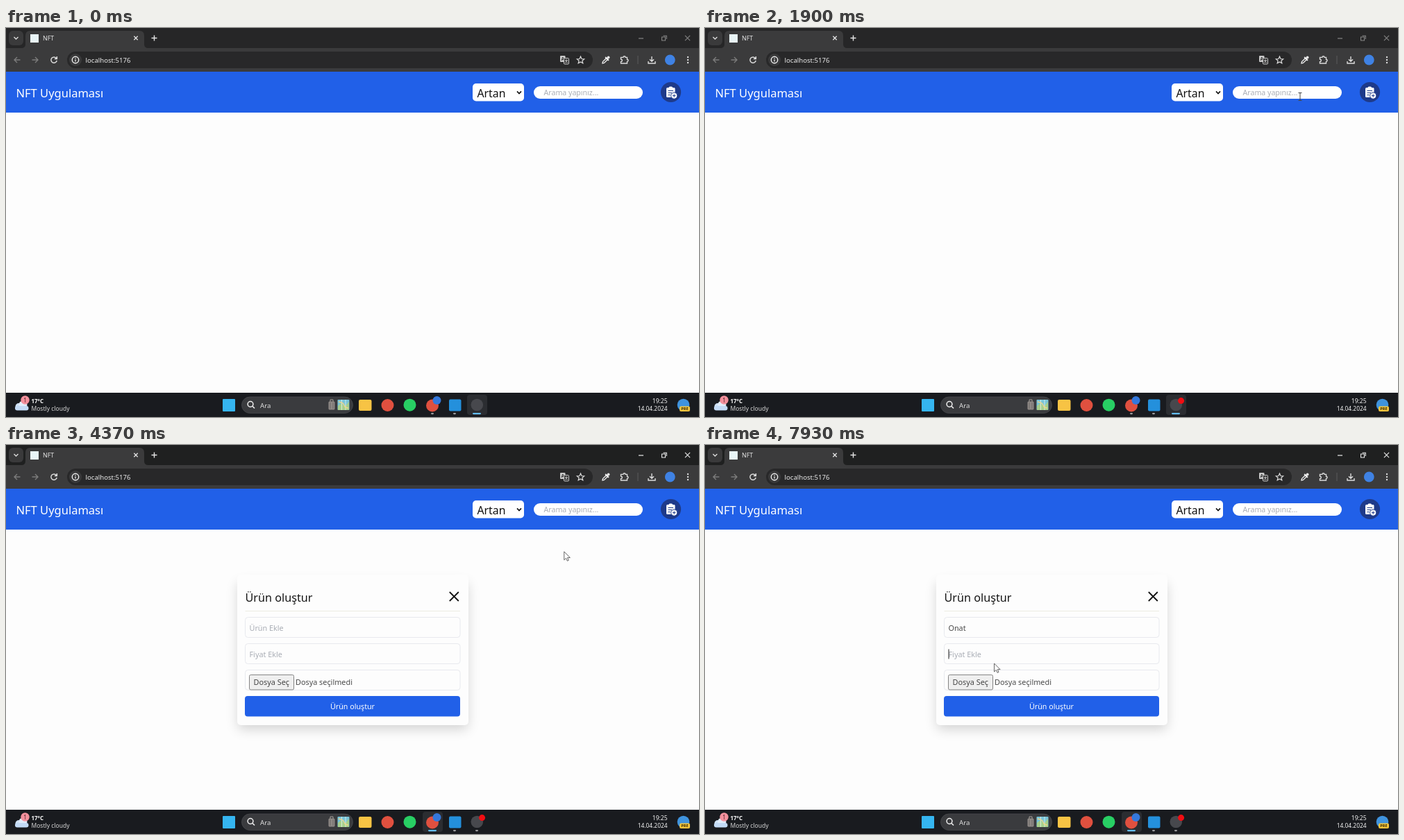
An HTML page with a canvas for the animation above (8000 ms loop, 998 px wide and 561 px high).

```html
<!DOCTYPE html>
<html lang="tr">
<head>
<meta charset="utf-8">
<title>NFT</title>
<style>
  html, body { margin: 0; width: 100%; height: 100%; overflow: hidden; background: #fdfdfd; }
  canvas { display: block; width: 100%; height: 100%; }
</style>
</head>
<body>
<canvas id="stage"></canvas>
<script>
const W = 998, H = 561, LOOP = 8000;
const BLUE = '#2160e8', PAPER = '#fdfdfd', ICON = '#dcdcdc', DIM = '#7c7c7c';
const canvas = document.getElementById('stage');
const ctx = canvas.getContext('2d');
const dpr = window.devicePixelRatio || 1;
canvas.width = W * dpr;
canvas.height = H * dpr;

// Timeline in ms
const RECORD = 300, FOCUS_SEARCH = 2170, PRESS_ADD = 3850, OPEN = 4000;
const FOCUS_NAME = 4750, KEYS = [5800, 6130, 6450, 6850], POINTER_BACK = 7080, FOCUS_PRICE = 7640;
const NAME = 'Onat';

// Pointer path: time, x, y
const PATH = [
  [620, -8, 228], [670, 4, 225], [840, 18, 214], [1120, 330, 130], [1400, 830, 58],
  [1530, 965, 42], [1670, 930, 75], [1820, 860, 98], [1900, 857, 99], [2300, 855, 100],
  [2900, 855, 100], [3200, 912, 76], [3340, 917, 81], [3650, 966, 95], [4150, 966, 95],
  [4230, 960, 101], [4660, 482, 262], [4900, 480, 262], [5200, 479, 248], [5800, 479, 248],
  [POINTER_BACK, 479, 252], [7500, 424, 301], [7660, 420, 303], [7900, 416, 315]
];

function rect(x, y, w, h, color) {
  ctx.fillStyle = color;
  ctx.fillRect(x, y, w, h);
}

function box(x, y, w, h, r, fill, stroke, lw = 1) {
  ctx.beginPath();
  ctx.roundRect(x, y, w, h, r);
  if (fill) { ctx.fillStyle = fill; ctx.fill(); }
  if (stroke) { ctx.strokeStyle = stroke; ctx.lineWidth = lw; ctx.stroke(); }
}

function disc(x, y, r, fill, stroke, lw = 1.3) {
  ctx.beginPath();
  ctx.arc(x, y, r, 0, Math.PI * 2);
  if (fill) { ctx.fillStyle = fill; ctx.fill(); }
  if (stroke) { ctx.strokeStyle = stroke; ctx.lineWidth = lw; ctx.stroke(); }
}

// Draws an SVG path with its origin at x, y.
function path(x, y, d, stroke, lw = 1.4, fill) {
  const p = new Path2D(d);
  ctx.save();
  ctx.translate(x, y);
  if (fill) { ctx.fillStyle = fill; ctx.fill(p); }
  if (stroke) { ctx.strokeStyle = stroke; ctx.lineWidth = lw; ctx.stroke(p); }
  ctx.restore();
}

function text(s, x, y, size, color, align = 'left', weight = 400) {
  ctx.font = `${weight} ${size}px "Noto Sans", "Open Sans", sans-serif`;
  ctx.textAlign = align;
  ctx.fillStyle = color;
  ctx.fillText(s, x, y);
}

function drawTabs(active) {
  const tone = active ? '#ededed' : '#858585';
  rect(0, 0, W, 29, active ? '#1f2020' : '#262627');
  box(4, 4, 21, 21, 6, '#3a3a3b');
  path(14.5, 14.5, 'M-3-1.5L0 1.5L3-1.5', ICON);
  path(0, 0, 'M22 29Q28 29 28 23V11Q28 4 35 4H192Q199 4 199 11V23Q199 29 205 29Z', null, 1, '#3b3b3c');
  rect(35, 9, 12, 12, '#e9f5f7');
  text('NFT', 53, 18, 8.8, '#e6e6e6');
  path(187, 14.5, 'M-2.7-2.7L2.7 2.7M2.7-2.7L-2.7 2.7', '#e4e4e4', 1.3);
  path(213.5, 14.5, 'M-4 0H4M0-4V4', '#e4e4e4', 1.4);
  path(914.5, 15, 'M-3.5 0H3.5', tone, 1.2);
  path(948, 14.5, 'M-3.5-1.5H1.5V3.5H-3.5ZM-1.5-3.2H3.3V1.5', tone, 1.1);
  path(981.5, 14.5, 'M-3.6-3.6L3.6 3.6M3.6-3.6L-3.6 3.6', tone, 1.1);
}

function drawToolbar() {
  rect(0, 29, W, 34, '#3b3b3c');
  path(16, 46, 'M4.5 0H-4M0-4L-4 0L0 4', DIM);
  path(42, 46, 'M-4.5 0H4M0-4L4 0L0 4', DIM);
  path(69, 46, 'M3.6-2.2A4.2 4.2 0 1 0 4.2 1M4.3-5V-1.6H.9', ICON, 1.5);
  box(88, 34, 757, 24, 12, '#282829');
  disc(100, 46, 9, '#3a3a3b');
  disc(100, 46, 4.7, null, '#f0f0f0', 1.4);
  path(100, 46, 'M0-.4V2.6M0-2.7V-1.4', '#f0f0f0', 1.3);
  text('localhost:5176', 114.5, 49.7, 9.6, '#ececec');

  // Translate, star, pipette, extensions, download
  box(798, 40, 7.5, 9, 1, '#c9c9c9');
  text('A', 801.7, 47, 6.5, '#333', 'center', 700);
  box(803.5, 43.5, 7, 8.5, 1, '#333', '#c9c9c9', 1);
  path(807, 48, 'M-2-1.5H2M0-2.7V-1.5M1.3-1.5Q.5 1.2-2 2M-1.2-1Q0 1.4 2 2', '#c9c9c9', .8);
  path(827.5, 46.3, 'M0-5.2L1.5-1.8L5.2-1.5L2.4.9L3.3 4.5L0 2.6L-3.3 4.5L-2.4.9L-5.2-1.5L-1.5-1.8Z', ICON, 1.2);
  path(864, 46, 'M-5 5L-4.5 2.6L.6-2.5L2.5-.6L-2.6 4.5Z', '#f2f2f2', 1.3);
  path(864, 46, 'M-.8-4L4 .8M1.6-1.6L4-4', '#f2f2f2', 2);
  disc(867.6, 42.4, 1.9, '#f2f2f2');
  path(890.5, 46, 'M-5-3.6H-1.6A1.6 1.6 0 0 1 1.6-3.6H4V-.8A1.6 1.6 0 0 1 4 2.4V5H-5V2.6A1.8 1.8 0 0 0-5-1Z', ICON, 1.4);
  rect(909.5, 40, 1, 12, '#5c5c5d');
  path(930, 46, 'M0-5V2M-3-.8L0 2.2L3-.8M-5 2V5H5V2', ICON, 1.4);
  disc(956.3, 46, 7.4, '#3f82e4');
  for (const dy of [-4, 0, 4]) disc(982, 46 + dy, 1.2, ICON);
}

function drawHeader(t) {
  rect(0, 63, W, 59, BLUE);
  text('NFT Uygulaması', 14.5, 100, 16.5, '#fff');
  box(672, 80, 74, 25.5, 5, '#fff');
  text('Artan', 678.5, 100, 15.8, '#111');
  path(739, 93, 'M-3-1.6L0 1.6L3-1.6', '#111', 1.6);

  const focused = t >= FOCUS_SEARCH && t < PRESS_ADD;
  if (focused) box(758.2, 82.2, 160.6, 21.6, 10.8, '#fff');
  box(760, 84, 157, 18, 9, '#fff', focused && '#101010', 1.5);
  text('Arama yapınız...', 774.5, 97, 10.6, '#a9adb5');
  if (focused) drawCaret(774.5, 93, t - FOCUS_SEARCH);

  disc(957.5, 92.5, 14.6, '#1e3a8a');
  box(951, 86, 12.5, 14, 1.5, '#fff');
  box(954.5, 84.6, 5.5, 3.4, 1.5, '#fff');
  path(953.5, 90.5, 'M0 0H7.5M0 3H5.5M0 6H3', '#1e3a8a', 1.2);
  disc(962.2, 97.6, 4.6, '#fff', '#1e3a8a', 1);
  path(962.2, 97.6, 'M-2.2 0H2.2M0-2.2V2.2', '#1e3a8a', 1);
}

function drawCaret(x, y, age) {
  if (age % 1000 < 500) rect(x, y - 7, 1, 14, '#222');
}

function drawForm(t) {
  ctx.save();
  ctx.shadowColor = 'rgba(0,0,0,.17)';
  ctx.shadowBlur = 17 * dpr;
  ctx.shadowOffsetY = 7 * dpr;
  box(334, 192, 331, 211, 5, PAPER);
  ctx.restore();
  box(333, 187, 333, 217, 5, PAPER);

  text('Ürün oluştur', 344.5, 226, 16.2, '#151515');
  path(645.3, 218.5, 'M-6.5-6.5L6.5 6.5M6.5-6.5L-6.5 6.5', '#111', 1.8);
  rect(344.5, 239, 309.5, 1, '#ecece2');
  for (const y of [248.5, 286.5, 324.5]) box(344.5, y, 309.5, 29, 4, null, '#e8e9ee');

  const typed = KEYS.filter(k => t >= k).length;
  if (typed) text(NAME.slice(0, typed), 350.5, 268, 10.8, '#4a4a4a');
  else text('Ürün Ekle', 350.5, 268, 10.8, '#a9adb5');
  text('Fiyat Ekle', 350.5, 306, 10.8, '#a9adb5');

  if (t >= FOCUS_PRICE) {
    drawCaret(350.5, 301.5, t - FOCUS_PRICE);
  } else if (t >= FOCUS_NAME) {
    const x = typed ? 351 + ctx.measureText(NAME.slice(0, typed)).width : 350.5;
    drawCaret(x, 263.5, t - (typed ? KEYS[typed - 1] : FOCUS_NAME));
  }

  box(350.5, 331.5, 64, 21.5, 2, '#efefef', '#858585');
  text('Dosya Seç', 356.5, 346, 10.9, '#444');
  text('Dosya seçilmedi', 417, 346, 10.85, '#4a4a4a');
  box(344, 362, 310, 29.5, 4, BLUE);
  text('Ürün oluştur', 499, 381, 10.7, '#fff', 'center');
}

// Running-app marker under a taskbar icon.
function drawRunning(x, current) {
  const w = current ? 12 : 4;
  box(x - w / 2, 555, w, 2.2, 1.1, current ? '#63bdf2' : '#9a9a9c');
}

function drawTaskbar(t, active) {
  rect(0, 526, W, 35, '#191b1f');
  disc(18.5, 546, 5, '#cfe2f7');
  disc(24.5, 543.5, 6, '#e2eefb');
  box(13, 545, 19.5, 6.5, 3.2, '#c3dbf6');
  disc(27.5, 536.5, 6.2, '#f3909c');
  text('1', 27.5, 539.5, 8, '#4a1f25', 'center');
  text('17°C', 36.5, 541, 7.9, '#fff', 'left', 600);
  text('Mostly cloudy', 36.5, 552, 8.5, '#d6d6d6');

  box(312, 535, 18, 18, 1, '#35b5f0');
  box(339.5, 532, 160, 23.5, 11.7, '#3a3b3e', '#4a4b4e', .8);
  disc(352, 542.5, 3.9, null, '#f0f0f0', 1.5);
  path(355, 545.5, 'M0 0L3 3', '#f0f0f0', 1.6);
  text('Ara', 366, 547.5, 9.6, '#dedede');

  // Suitcase and folded map in the search pill
  path(469, 536, 'M-2 3V0H2V3', '#a7a19b', 1);
  box(464.5, 538.5, 9, 12, 1.5, '#8f8a86');
  path(469, 540, 'M-2 0V9M2 0V9', '#6d6966', 1);
  box(477.5, 536, 17, 15, 1, '#79c5d8');
  path(478, 536, 'M0 9L5 5L10 10L16 3V15H0Z', null, 1, '#a6cf8c');
  path(478, 536, 'M5.5 0V15M11 0V15', '#e8f3ee', .8);
  path(478, 536, 'M1 3Q8 4 9 8T15 12', '#f0d58a', 1.3);

  box(active ? 600 : 664, 529, 29, 29, 4, '#2b2d31');
  box(508, 536, 18.5, 16, 2, '#f7c344');
  disc(549.5, 544, 9, '#e0503f');
  disc(581.5, 543.7, 9, '#28cf64');
  disc(614, 544.5, 9, '#e0503f');
  disc(620.5, 537, 6, '#3478dc');
  box(638, 535.5, 17.5, 17, 2, '#2490dc');
  disc(678.3, 543.5, 8.8, '#47484d');
  if (t >= RECORD) disc(685.6, 537.6, 4.5, '#f20d12');
  drawRunning(614, active);
  drawRunning(646, false);
  drawRunning(678, !active);

  text('19:25', 952.5, 541, 8.5, '#f2f2f2', 'right');
  text('14.04.2024', 952.5, 552, 8.4, '#f2f2f2', 'right');
  disc(975.5, 543.5, 8.8, '#3f93dd');
  box(970, 545.5, 15, 7.5, 2, '#f4c53d');
  text('PRE', 977.5, 551.4, 5.6, '#3a2c05', 'center', 700);
}

function pointerAt(t) {
  const i = PATH.findIndex(p => p[0] > t);
  if (i < 0) return PATH[PATH.length - 1].slice(1);
  const [t0, x0, y0] = PATH[i - 1], [t1, x1, y1] = PATH[i];
  const k = (t - t0) / (t1 - t0);
  return [x0 + (x1 - x0) * k, y0 + (y1 - y0) * k];
}

function drawPointer(t) {
  if (t < PATH[0][0] || (t >= KEYS[0] && t < POINTER_BACK)) return;
  const [x, y] = pointerAt(t);
  const inside = (l, top, r, b) => x >= l && x <= r && y >= top && y <= b;
  const overField = inside(760, 84, 917, 102) ||
    (t >= OPEN && (inside(344, 247, 654, 278) || inside(344, 286, 654, 314)));
  if (overField) {
    path(x, y, 'M-2.5-5.5H2.5M-2.5 5.5H2.5M0-5.5V5.5', '#444', 1);
  } else {
    path(x + .5, y, 'M0 0V12L2.8 9.4L4.6 13.4L6.5 12.5L4.8 8.7H8.6Z', '#555', .9, '#fff');
  }
}

function draw(t) {
  const active = t >= FOCUS_SEARCH;
  ctx.setTransform(dpr, 0, 0, dpr, 0, 0);
  rect(0, 0, W, H, PAPER);
  drawTabs(active);
  drawToolbar();
  drawHeader(t);
  if (t >= OPEN) drawForm(t);
  drawTaskbar(t, active);
  drawPointer(t);
}

function tick() {
  draw(performance.now() % LOOP);
  requestAnimationFrame(tick);
}
tick();
</script>
</body>
</html>
```
